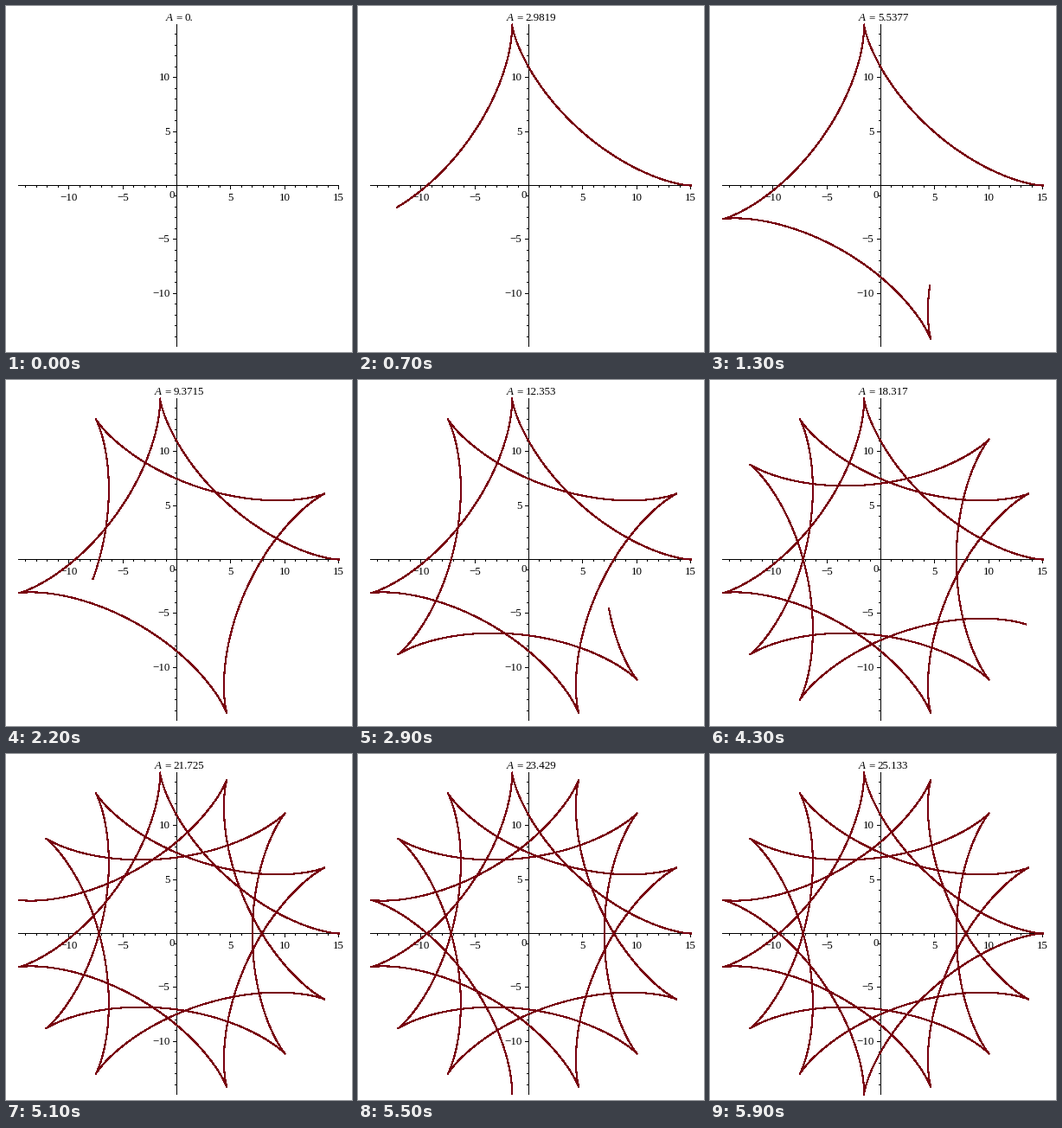
A matplotlib script that plays this animation: 400x400 px, repeating every 6 s.

```python
import numpy as np
import matplotlib.pyplot as plt
from matplotlib.animation import FuncAnimation

SIZE, DPI = 400, 100
PX = 72 / DPI                  # one pixel in points
FRAMES, INTERVAL = 60, 100
X0, Y0, UNIT = 197.5, 207.5, 12.47
R, r = 15, 4                   # fixed and rolling circle radii
A_MAX = 8 * np.pi
FONT = 13

plt.rcParams["font.family"] = "Liberation Serif"
plt.rcParams["path.simplify"] = False

fig = plt.figure(figsize=(SIZE / DPI, SIZE / DPI), dpi=DPI, facecolor="white")
ax = fig.add_axes([0, 0, 1, 1])
ax.set(xlim=(0, SIZE), ylim=(SIZE, 0))
ax.axis("off")


def label(x, y, text, ha="center", **kw):
    return ax.text(x, y, text, ha=ha, va="baseline", fontsize=FONT * PX, **kw)


def segment(x, y):
    ax.plot(x, y, color="black", lw=PX, antialiased=False, snap=False,
            solid_capstyle="butt")


def pixel(v):
    return np.floor(v) + 0.5


def number(n):
    return str(n).replace("-", "\u2212")


def draw_axes():
    segment([14, 385], [Y0, Y0])
    segment([X0, X0], [21, 394])
    for n in range(-14, 16):
        if n == 0:
            continue
        major = n % 5 == 0
        length = 4.5 if major else 2.5
        x, y = pixel(X0 + UNIT * n), pixel(Y0 - UNIT * n)
        segment([x, x], [Y0, Y0 + length])
        if major:
            label(x, 225, number(n))
        if n < 15:
            segment([X0 - length, X0], [y, y])
            if major:
                label(189.5, y + 3.9, number(n), ha="right")
    label(191.3, 222.5, "0")


def hypocycloid(t):
    k = (R - r) / r
    x = (R - r) * np.cos(t) + r * np.cos(k * t)
    y = (R - r) * np.sin(t) - r * np.sin(k * t)
    return X0 + UNIT * x, Y0 - UNIT * y


draw_axes()
curve, = ax.plot([], [], color="#78000e", lw=1.1 * PX, antialiased=False,
                 snap=False, solid_joinstyle="round", zorder=4)
title = [label(0, 17, "A", ha="left", style="italic"),
         label(0, 17, "=", ha="left"),
         label(0, 17, "", ha="left")]


def set_title(a):
    value = f"{a:#.5g}" if a else "0."
    gap = 5 / 18
    widths = [0.611, 0.564, 0.5 * (len(value) - 1) + 0.25]
    x = 200.5 - FONT * (sum(widths) + 2 * gap) / 2
    title[2].set_text(value)
    for part, w in zip(title, widths):
        part.set_x(x)
        x += FONT * (w + gap)


def update(i):
    a = A_MAX * i / (FRAMES - 1)
    if i:
        curve.set_data(*hypocycloid(np.linspace(0, a, 20 * i + 40)))
    else:
        curve.set_data([], [])
    set_title(a)
    return [curve, *title]


anim = FuncAnimation(fig, update, frames=FRAMES, interval=INTERVAL,
                     repeat=True, repeat_delay=0, blit=False)
plt.show()
```
